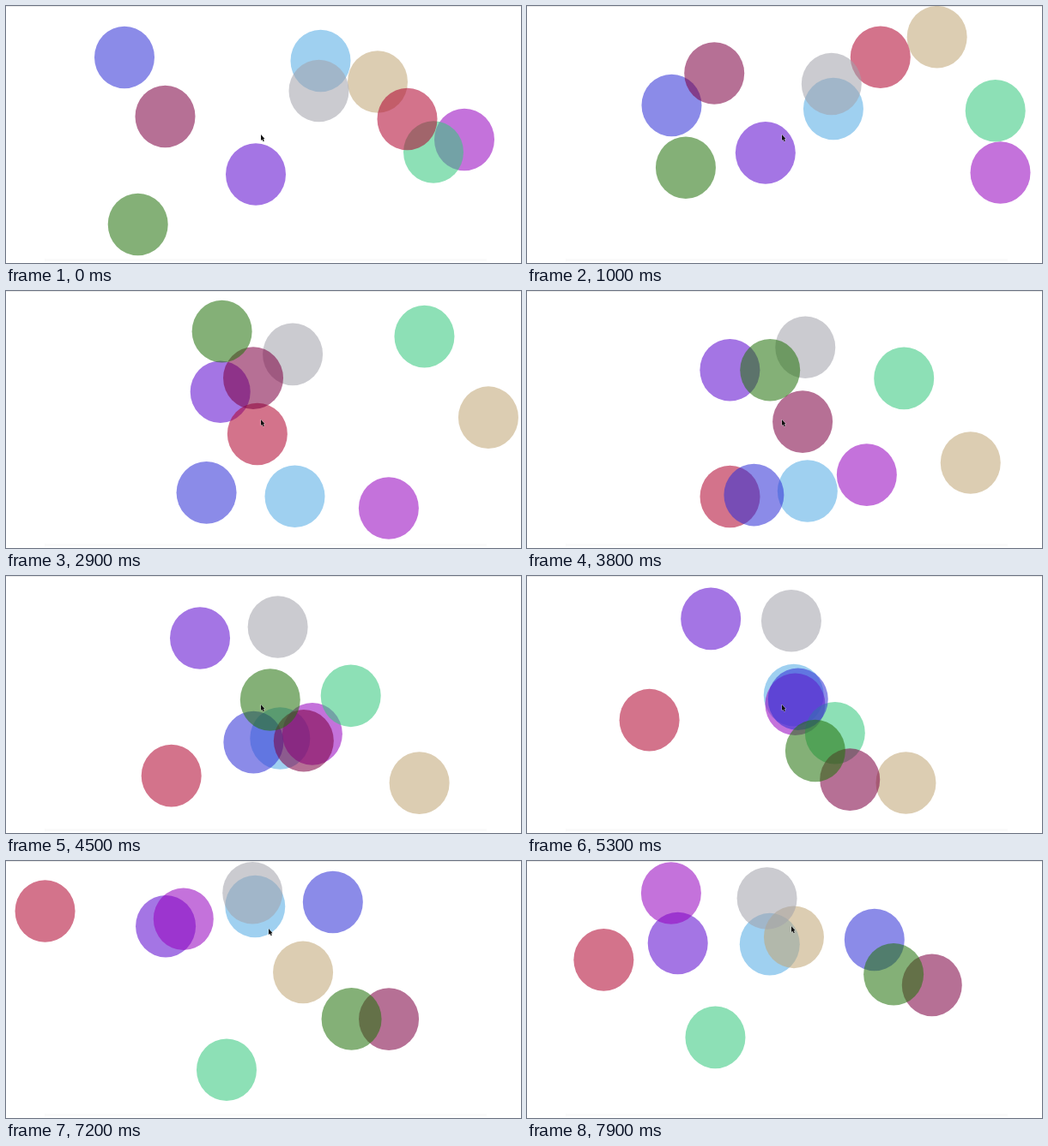
Write an HTML page with a canvas that moves like this. It is 600 px wide and 300 px high and loops after 8000 ms.

```html
<!DOCTYPE html>
<html lang="en">
<head>
<meta charset="utf-8">
<title>Bouncing discs</title>
<style>
html, body { margin: 0; width: 100%; height: 100%; overflow: hidden; background: #fff; }
canvas { display: block; }
</style>
</head>
<body>
<canvas id="stage" width="600" height="300"></canvas>
<script>
const ctx = document.getElementById('stage').getContext('2d');
const LOOP = 8000, STEP = 100;
const RX = 35, RY = 36.3;
const LEFT = 34.6, RIGHT = 567.5, TOP = 36.2, BOTTOM = 265;
const LAG = 0.11, LAG_END = 0.9;

const disc = (color, x, y, vx, vy) => ({ color, x, y, vx, vy });

// Start and speed (px per second), back to front
const discs = [
  disc('#5d09cf', 291, 196.5, -14.8, -28.25),
  disc('#54abe4', 366.5, 64, -10.75, 63),
  disc('#9705bf', 534, 156, 55.6, 43.2),
  disc('#35c87e', 498, 170.5, 53.6, -54.2),
  disc('#c1a676', 433, 88.5, 50.2, -58.7),
  disc('#b00730', 467.5, 132, -62.6, -81.2),
  disc('#a2a2ab', 364.5, 99, -10.9, -9),
  disc('#3030d6', 138, 60, 34.25, 62.85),
  disc('#7e0042', 185.5, 129, 36.75, -56.7),
  disc('#25720e', 153.7, 255, 35.1, -74.5)
];

// Reflect a straight path between two walls
function bounce(p, lo, hi) {
  const span = hi - lo;
  const d = (((p - lo) % (2 * span)) + 2 * span) % (2 * span);
  return lo + (d > span ? 2 * span - d : d);
}

// The discs fall slightly behind while the clip starts up
const pace = s => s - LAG * Math.min(1, s / LAG_END);

const ramp = (s, from, to) => Math.min(1, Math.max(0, (s - from) / (to - from)));

const arrow = new Path2D('M0 0V7L1.5 5.7 2.6 8.2 3.8 7.7 2.8 5.3 4.6 5.2Z');

function drawPointer(s) {
  const rise = ramp(s, 5.4, 6.3), drift = ramp(s, 6.5, 7.4);
  ctx.save();
  ctx.translate(297 + 2 * rise + 9 * drift, 150 - 60 * rise - 14 * drift);
  ctx.lineWidth = 0.8;
  ctx.strokeStyle = 'rgba(255,255,255,0.7)';
  ctx.stroke(arrow);
  ctx.fillStyle = '#111';
  ctx.fill(arrow);
  ctx.restore();
}

function rect(color, x, y, w, h) {
  ctx.fillStyle = color;
  ctx.fillRect(x, y, w, h);
}

function draw(s) {
  rect('#fff', 0, 0, 600, 300);
  rect('#e9e9e9', 0, 0, 600, 1);
  rect('#fafafa', 45, 295, 515, 3);

  const t = pace(s);
  ctx.globalAlpha = 0.56;
  for (const { color, x, y, vx, vy } of discs) {
    ctx.fillStyle = color;
    ctx.beginPath();
    ctx.ellipse(bounce(x + vx * t, LEFT, RIGHT), bounce(y + vy * t, TOP, BOTTOM), RX, RY, 0, 0, 2 * Math.PI);
    ctx.fill();
  }
  ctx.globalAlpha = 1;
  drawPointer(s);
}

const start = performance.now();
function tick() {
  const ms = (performance.now() - start) % LOOP;
  draw(Math.floor(ms / STEP) * STEP / 1000);
  requestAnimationFrame(tick);
}
tick();
</script>
</body>
</html>
```
